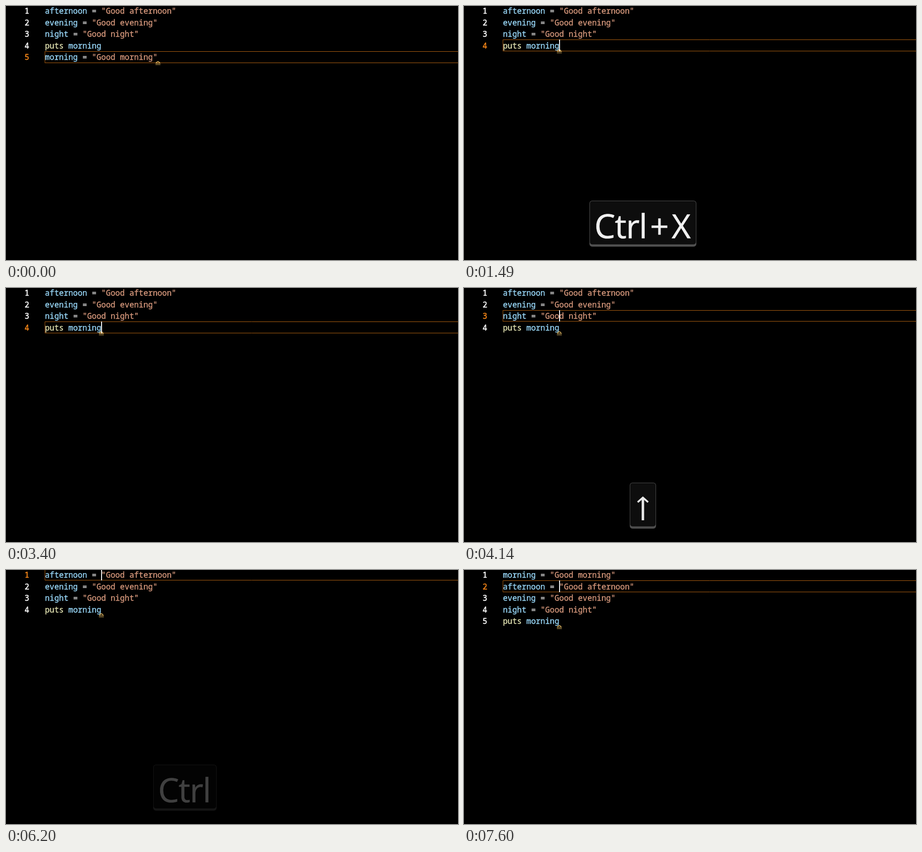
Animation of 998x561 px, one loop 8000 ms. Source, as an HTML page with a canvas:

```html
<!DOCTYPE html>
<html lang="en">
<head>
<meta charset="utf-8">
<title>Cut and paste a line</title>
<style>
  html, body { margin: 0; width: 100%; height: 100%; overflow: hidden; background: #000; }
  canvas { display: block; }
</style>
</head>
<body>
<canvas id="stage" width="998" height="561"></canvas>
<script>
const ctx = document.getElementById('stage').getContext('2d');
const LOOP = 8000, LEFT = 86, CHAR = 10.36, ROW = 25.6, FIRST_BOTTOM = 23.2;
const CODE_FONT = '17.26px "Noto Sans Mono", monospace';
const KEY_FONT = '73px "Open Sans", "Noto Sans", sans-serif';
const ORANGE = '#f38518', BORDER = '#b86512', MARK = '#ecc066';

const greet = word => [[word, '#9cdcfe'], [' = ', '#d4d4d4'], [`"Good ${word}"`, '#d6987c']];
const morning = greet('morning');
const puts = [['puts ', '#e6e6b4'], ['morning', '#9cdcfe']];
const rest = ['afternoon', 'evening', 'night'].map(greet);
const before = [...rest, puts, morning];
const cut = [...rest, puts];
const pasted = [morning, ...rest, puts];

// Each entry: start time, lines, active row, cursor column
const edits = [
  [0, before, 4, 24], [1490, cut, 3, 12], [3930, cut, 2, 12],
  [4480, cut, 1, 12], [4950, cut, 0, 12], [6610, pasted, 1, 12]
];
const caretSpans = [[470, 1000], [1490, 1950], [2480, 2940], [3400, 4410],
  [4480, 5410], [5940, 6410], [6610, 7070], [7600, LOOP]];
// Each entry: start, end, key, whether it fades in
const keySpans = [[1070, 1490, 'Ctrl', true], [1490, 2220, 'X', false], [3930, 5740, 'Up', true],
  [6200, 6610, 'Ctrl', true], [6610, 7400, 'V', false]];

const rowBottom = row => FIRST_BOTTOM + ROW * row;
const columnX = column => LEFT + CHAR * column;

// The thin outline gives the text a slightly heavier weight
function drawText(text, x, y, color, outline) {
  ctx.fillStyle = ctx.strokeStyle = color;
  ctx.lineWidth = outline;
  ctx.lineJoin = 'round';
  ctx.fillText(text, x, y);
  ctx.strokeText(text, x, y);
}

function drawLine(parts, row, active) {
  const baseline = 17 + ROW * row;
  drawText(row + 1, 41, baseline, active ? ORANGE : '#fff', 0.6);
  let column = 0;
  for (const [text, color] of parts) {
    drawText(text, columnX(column), baseline, color, 0.4);
    column += text.length;
  }
  return column;
}

function drawEndMark(column, row) {
  const x = Math.round(columnX(column)) - 5, y = Math.round(rowBottom(row));
  ctx.fillStyle = ctx.strokeStyle = MARK;
  ctx.fillRect(x, y, 11, 1);
  ctx.fillRect(x, y + 3, 11, 1);
  ctx.lineWidth = 1.5;
  ctx.beginPath();
  ctx.moveTo(x + 1.5, y);
  ctx.quadraticCurveTo(x + 5.5, y - 7, x + 9.5, y);
  ctx.stroke();
}

function drawEditor(t) {
  const [, lines, active, column] = edits.findLast(edit => edit[0] <= t);
  const top = Math.round(rowBottom(active - 1)), bottom = Math.round(rowBottom(active));
  ctx.strokeStyle = BORDER;
  ctx.lineWidth = 1;
  ctx.strokeRect(LEFT, top + 0.5, 1000, bottom - top - 1);

  ctx.font = CODE_FONT;
  ctx.textAlign = 'left';
  ctx.letterSpacing = '0px';
  let length = 0;
  lines.forEach((parts, row) => { length = drawLine(parts, row, row === active); });
  drawEndMark(length, lines.length - 1);

  if (caretSpans.some(([from, to]) => t >= from && t < to)) {
    ctx.fillStyle = '#fff';
    ctx.fillRect(Math.round(columnX(column)), top, 2, bottom - top);
  }
}

function fillRound(x, y, width, height, radius, color) {
  ctx.fillStyle = color;
  ctx.beginPath();
  ctx.roundRect(x, y, width, height, radius);
  ctx.fill();
}

function drawKey(key, alpha) {
  const gray = value => `rgb(${[value, value, value].map(v => Math.round(v * alpha))})`;
  const [x, width] = { Ctrl: [325, 140], X: [277, 236], V: [276, 239], Up: [366, 58] }[key];
  fillRound(x, 430, width, 101.5, 6, gray(80));
  fillRound(x + 1, 431, width - 2, 95.5, 5, gray(13));

  const ink = gray(240);
  if (key === 'Up') {
    ctx.fillStyle = ctx.strokeStyle = ink;
    ctx.fillRect(392.3, 464, 5.4, 49);
    ctx.lineWidth = 4;
    ctx.lineJoin = 'miter';
    ctx.beginPath();
    ctx.moveTo(383.5, 473);
    ctx.lineTo(395, 463);
    ctx.lineTo(406.5, 473);
    ctx.stroke();
    return;
  }
  ctx.font = KEY_FONT;
  ctx.textAlign = 'center';
  ctx.letterSpacing = '-1px';
  drawText('Ctrl', x + 69, 512.5, ink, 0.7);
  if (key !== 'Ctrl') {
    drawText('+', x + 154, 512.5, ink, 0.7);
    drawText(key, x + width - 34, 512.5, ink, 0.7);
  }
}

function frame(now) {
  const t = now % LOOP;
  ctx.fillStyle = '#000';
  ctx.fillRect(0, 0, 998, 561);
  drawEditor(t);
  const span = keySpans.find(([from, to]) => t >= from && t < to);
  if (span) {
    const [from, , key, fades] = span;
    const elapsed = Math.floor((t - from) / 70) * 70;
    drawKey(key, fades ? Math.min(1, (elapsed + 80) / 300) : 1);
  }
  requestAnimationFrame(frame);
}
requestAnimationFrame(frame);
</script>
</body>
</html>
```
